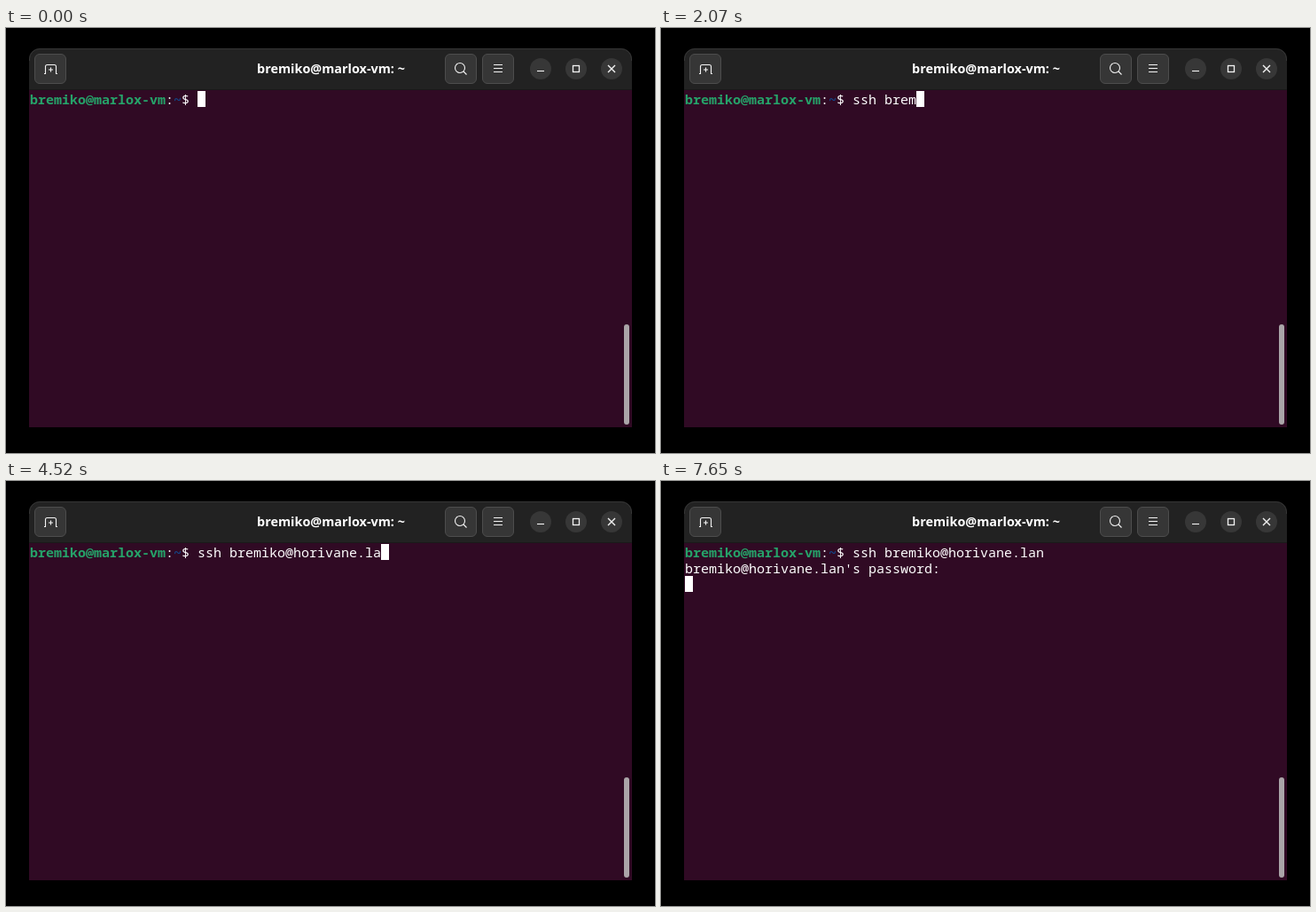
Animation, 732 px wide and 479 px high, one loop 8 s. Source, as an HTML page:

```html
<!DOCTYPE html>
<html lang="en">
<head>
<meta charset="utf-8">
<title>Terminal</title>
<style>
  html, body { margin: 0; width: 100%; height: 100%; overflow: hidden; background: #000; }
  svg { display: block; width: 732px; height: 479px; }
  text { fill: #fff; white-space: pre; }
  .title { font: 700 14.4px "Noto Sans", "Open Sans", sans-serif; text-anchor: middle; }
  .term { font: 500 15px "Noto Sans Mono", "DejaVu Sans Mono", monospace; }
  .user { fill: #26a269; font-weight: 700; }
  .path { fill: #12488b; font-weight: 700; }
  .button { fill: #363636; stroke: #4d4d4d; }
  .round { fill: #373737; }
  .icon { fill: none; stroke: #f4f4f4; stroke-width: 1.1; }
</style>
</head>
<body>
<svg viewBox="0 0 732 479">
  <rect width="732" height="479"/>
  <path fill="#222" d="M26 69V35a12 12 0 0 1 12-12H694a12 12 0 0 1 12 12V69z"/>
  <path fill="none" stroke="#363636" d="M26.5 37V35a11.5 11.5 0 0 1 11.5-11.5H694a11.5 11.5 0 0 1 11.5 11.5V37"/>
  <rect x="26" y="69" width="680" height="1" fill="#1a1a1a"/>
  <rect x="26" y="70" width="680" height="380" fill="#300a24"/>
  <rect x="697" y="334" width="6" height="113" rx="3" fill="#aaa5a8"/>

  <g class="button">
    <rect x="32.5" y="29.5" width="35" height="33" rx="5.5"/>
    <rect x="495.5" y="29.5" width="35" height="33" rx="5.5"/>
    <rect x="537.5" y="29.5" width="35" height="33" rx="5.5"/>
  </g>
  <g class="round">
    <circle cx="603" cy="46" r="12"/>
    <circle cx="643" cy="46" r="12"/>
    <circle cx="683" cy="46" r="12"/>
  </g>
  <g class="icon">
    <path d="M43 51.5h1.5v-8a2 2 0 0 1 2-2h8a2 2 0 0 1 2 2v8H58M50.5 44.5v5M48 47h5"/>
    <circle cx="512" cy="45" r="5.5"/>
    <path d="M516 49l3.5 3.5M550 41.5h10M550 45.5h10M550 49.5h10"/>
    <path d="M599 48.5h8"/>
    <rect x="639.5" y="42.5" width="7" height="7" stroke-width="1.3"/>
    <path d="M679 42l8 8M687 42l-8 8" stroke-width="1.4"/>
  </g>
  <text class="title" x="366.5" y="51">bremiko@marlox-vm: ~</text>

  <g class="term">
    <text x="27" y="86"><tspan class="user">bremiko@marlox-vm</tspan>:<tspan class="path">~</tspan>$ <tspan id="typed"></tspan></text>
    <text id="prompt" x="27" y="104">bremiko@horivane.lan's password: </text>
  </g>
  <rect id="cursor" width="9" height="18" fill="#fff"/>
</svg>
<script>
  const LOOP = 8000, CELL = 9, LINE = 18, LEFT = 27, TOP = 71;
  const command = "ssh bremiko@horivane.lan";
  const keyTimes = [
    940, 1100, 1280, 1530,
    1820, 1890, 1980, 2070, 2160, 2340, 2450, 2810,
    3260, 3360, 3470, 3570, 3730, 3820, 3980, 4070,
    4230, 4410, 4520, 4700
  ];
  const blinkOff = 2340, blinkOn = 4230;
  const enter = 4970, ask = 5150, submit = 7650;
  const promptCols = 21;

  const [typed, prompt, cursor] =
    ["typed", "prompt", "cursor"].map(id => document.getElementById(id));

  function cursorCell(t, count) {
    if (t >= submit) return [0, 2];
    if (t >= ask) return [prompt.textContent.length, 1];
    if (t >= enter) return [0, 1];
    return [promptCols + count, 0];
  }

  function draw(t) {
    const count = keyTimes.filter(k => k <= t).length;
    const [col, row] = cursorCell(t, count);
    typed.textContent = command.slice(0, count);
    prompt.style.display = t >= ask ? "" : "none";
    cursor.style.display = t >= blinkOff && t < blinkOn ? "none" : "";
    cursor.setAttribute("x", LEFT + col * CELL);
    cursor.setAttribute("y", TOP + row * LINE);
  }

  const start = performance.now();
  function tick() {
    draw((performance.now() - start) % LOOP);
    requestAnimationFrame(tick);
  }
  tick();
</script>
</body>
</html>
```
